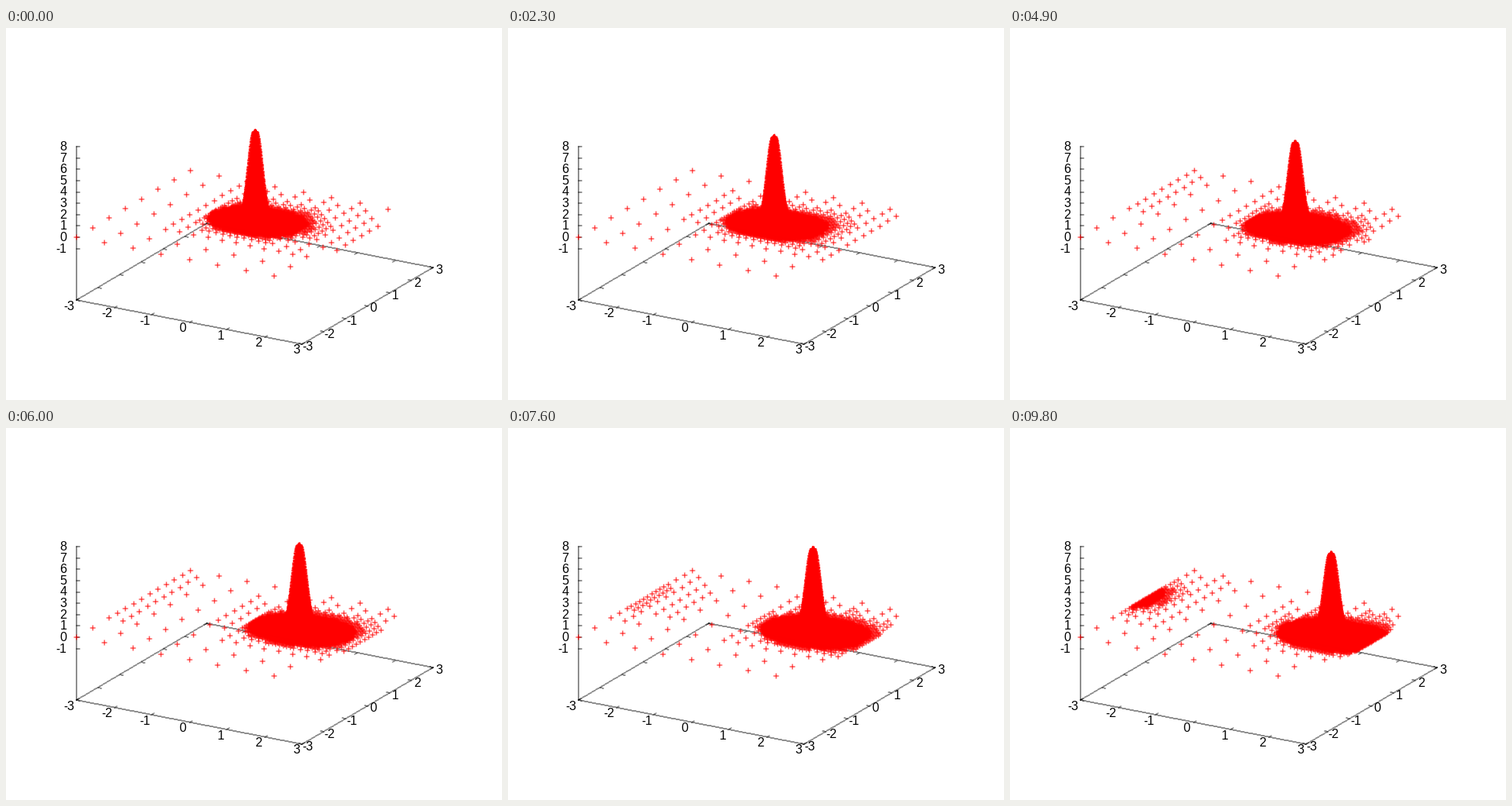
A matplotlib script that plays this animation: 640 px wide and 480 px high, repeating every 9.9 s.

```python
import numpy as np
import matplotlib.pyplot as plt
from matplotlib.animation import FuncAnimation
from matplotlib.path import Path

W, H, DPI = 640, 480, 100
FRAMES, INTERVAL = 99, 100
PX = 72 / DPI                      # one pixel in points
FONT = "Liberation Sans"
plt.rcParams["text.hinting"] = "native"
plt.rcParams["text.hinting_factor"] = 1

# Cells per side, with the half axes of the zone in which they are split
LEVELS = [(8, .397, .364), (16, .25, .225), (32, .215, .18),
          (64, .195, .15), (128, .11, .10), (256, .07, .07)]
START, SPEED = .503, .00325        # peak position and drift per frame


def project(u, v, z=0.0):
    """Unit square plus height to stage pixels."""
    return 90 + 291.4 * u + 168.2 * v, 269.1 + 57.1 * u - 98.9 * v - 14.65 * z


def floor_point(u, v):
    x, y = project(u, v)
    return x, y + 81


def wrap(d):
    return (d + .5) % 1 - .5


def cell_corners(m):
    k = np.arange(m) / m
    u, v = np.meshgrid(k, k)
    return u.ravel(), v.ravel()


CORNERS = {m: cell_corners(m) for m, _, _ in LEVELS}


def mesh(cu, growth):
    """Nodes of the periodic grid, refined around (cu, 0.5)."""
    us, vs = [CORNERS[8][0]], [CORNERS[8][1]]
    for m, a, b in LEVELS:
        u, v = CORNERS[m]
        g = growth if m > 8 else 1
        du = np.abs(wrap(u - cu) - .2 / m) / (a * g)
        dv = np.abs(v - .5 - .08 / m) / (b * g)
        split = du ** 2.3 + dv ** 2.3 < 1
        h = .5 / m
        for su, sv in ((h, 0), (0, h), (h, h)):
            us.append(u[split] + su)
            vs.append(v[split] + sv)
    return np.concatenate(us), np.concatenate(vs)


def cloud(i):
    cu = START + SPEED * i
    u, v = mesh(cu, 1 + .12 * i / FRAMES)
    amp = 7.9 - .0072 * i
    r2 = 36 * (wrap(u - cu) ** 2 + (v - .5) ** 2)
    return project(u, v, amp * np.exp(-29 * amp / 7.9 * r2))


fig = plt.figure(figsize=(W / DPI, H / DPI), dpi=DPI, facecolor="white")
ax = fig.add_axes([0, 0, 1, 1])
ax.set_xlim(0, W)
ax.set_ylim(H, 0)
ax.axis("off")

# Marker outlines on whole pixels, right of and below the anchor
DOT = Path([(0, 0), (1, 0), (1, -1), (0, -1), (0, 0)], closed=True)
PLUS = Path([(0, 3), (1, 3), (1, 0), (4, 0), (4, -1), (1, -1), (1, -4),
             (0, -4), (0, -1), (-3, -1), (-3, 0), (0, 0), (0, 3)], closed=True)


def stamp(x, y, path, size, color, zorder):
    """Crisp copies of a marker; size is its largest coordinate in pixels."""
    return ax.plot(x, y, ls="none", marker=path, ms=2 * size * PX,
                   mfc=color, mec="none", zorder=zorder)[0]


def line(p, q):
    p, q = np.round(p), np.round(q)
    n = int(np.abs(q - p).max()) + 1
    x, y = np.linspace(p, q, n).T
    stamp(np.round(x), np.round(y), DOT, 1, "black", 1)


def tick(p, dx, dy):
    line(p, (p[0] + dx, p[1] + dy))


def label(x, y, value, ha="center"):
    ax.text(x, y + 6, str(value), ha=ha, va="baseline", family=FONT,
            fontsize=16 * PX, color="black", zorder=1)


def draw_axes():
    corners = [floor_point(u, v) for u, v in ((0, 0), (1, 0), (1, 1), (0, 1))]
    for p, q in zip(corners, corners[1:] + corners[:1]):
        line(p, q)
    line((90, 350), (90, 152))
    for n in range(-3, 4):
        t = (n + 3) / 6
        tick(floor_point(t, 0), 3, -2)
        tick(floor_point(t, 1), -3, 2)
        tick(floor_point(1, t), -4, -1)
        tick(floor_point(0, t), 4, 1)
        label(81 + 294 * t, 358 + 56.5 * t, n)
        label(389.5 + 169.5 * t, 410 - 99 * t, n)
    for n in range(-1, 9):
        y = 269.1 - 14.65 * n
        tick((90, y), 4, 0)
        label(78.5, y, n, "right")


draw_axes()
points = stamp([], [], PLUS, 4, "#ff0000", 2)


def update(i):
    points.set_data(*cloud(i))
    return points,


anim = FuncAnimation(fig, update, frames=FRAMES, interval=INTERVAL,
                     repeat=True, repeat_delay=0)
plt.show()
```
